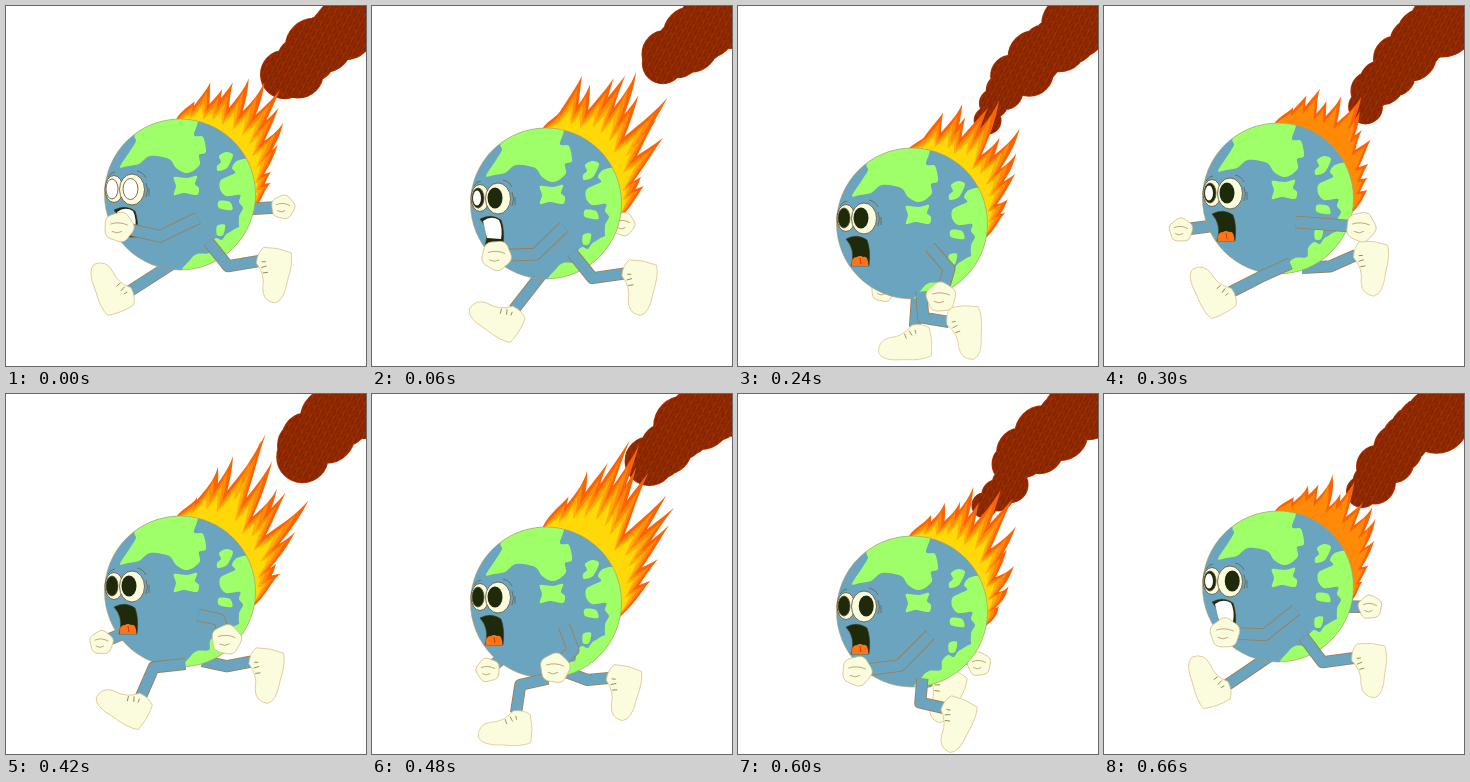
These frames come from a looping animation (360 px wide and 360 px high, 0.72 s). An HTML page:

```html
<!DOCTYPE html>
<html lang="en">
<head>
<meta charset="utf-8">
<title>Running Earth</title>
<style>
html, body { margin: 0; width: 100%; height: 100%; overflow: hidden; background: #fff; }
svg { display: block; width: 100vw; height: 100vh; }
</style>
</head>
<body>
<svg viewBox="0 0 360 360">
  <defs>
    <clipPath id="disc"><circle cx="174" cy="188.5" r="75.5"/></clipPath>
    <pattern id="soot" width="7" height="9" patternUnits="userSpaceOnUse" patternTransform="rotate(28)">
      <rect width="7" height="9" fill="#912a00"/>
      <path d="M1 0V6M4.5 3V9" stroke="#7c2300" stroke-width="1.3"/>
      <path d="M6.3 0V5" stroke="#aa3200"/>
    </pattern>
  </defs>
  <g id="smoke"></g>
  <g id="fire"></g>
  <g id="back"></g>
  <g id="globe">
    <circle cx="174" cy="188.5" r="75.5" fill="#6aa4be"/>
    <g id="land" clip-path="url(#disc)"></g>
    <circle cx="174" cy="188.5" r="75.5" fill="none" stroke="#b59a62" stroke-width=".6"/>
    <g id="face"></g>
  </g>
  <g id="front"></g>
</svg>
<script>
const STEP = 60, STEPS = 12, STRIDE = 6, CX = 174, CY = 188.5, R = 75.5;
const BLUE = '#6aa4be', GREEN = '#9fff68', CREAM = '#fbfbde', INK = '#a07c4c', DARK = '#1e2a09';
const { sin, cos, PI, hypot, max, min } = Math;

const $ = id => document.getElementById(id);
const clamp = v => max(0, min(1, v));
const mix = (a, b, t) => a + (b - a) * t;
const wave = turns => cos(2 * PI * turns);

function random(seed) {
  let s = seed * 7919 + 17;
  return () => (s = (s * 16807) % 2147483647) / 2147483647;
}

const path = (d, fill, stroke = 'none', w = 1) =>
  `<path d="${d}" fill="${fill}" stroke="${stroke}" stroke-width="${w}" stroke-linejoin="round"/>`;
const oval = (x, y, rx, ry, fill, stroke = 'none') =>
  `<ellipse cx="${x}" cy="${y}" rx="${rx}" ry="${ry}" fill="${fill}" stroke="${stroke}" stroke-width=".8"/>`;

// Closed smooth curve through the given points
function coast(s) {
  const n = s.split(' ').map(Number), p = [];
  for (let i = 0; i < n.length; i += 2) p.push([n[i], n[i + 1]]);
  const at = i => p[(i + p.length) % p.length];
  const handle = (i, side) => at(i).map((v, k) => v + side * (at(i + 1)[k] - at(i - 1)[k]) / 7);
  return 'M' + p[0] + p.map((_, i) => `C${handle(i, 1)} ${handle(i + 1, -1)} ${at(i + 1)}`).join('') + 'Z';
}

$('land').innerHTML = [
  '114 161 124 145 130 135 129 128 145 108 190 110 188 129 197 131 200 146 193 149 194 158 187 165 179 167 170 162 163 153 144 150 133 158 122 160',
  '168 171 181 172 191 170 189 178 193 182 191 189 178 187 168 189 170 180',
  '213 150 220 146 227 149 221 162 212 165 211 160 215 156',
  '246 153 231 155 226 162 229 167 215 174 214 183 220 190 234 189 233 196 237 202 233 211 236 224 262 215 262 165',
  '213 195 224 196 226 204 213 202',
  '211 220 219 219 217 229 211 229',
  '178 268 184 254 191 248 203 247 204 238 210 232 216 234 222 227 240 222 240 270'
].map(s => path(coast(s), GREEN)).join('');

// Height of the bounce over one stride
const drops = [0, 9, 20, 29, 29, 4];

// Key poses as [step, x, y, tilt]
const keys = {
  nearFoot: [[0, 253, 255, -75], [2, 252, 280, -75], [4, 211, 316, -88], [5, 127, 286, 66], [6, 126, 286, 66],
    [8, 144, 319, 3], [10, 206, 314, -62], [11, 250, 264, -82]],
  farFoot: [[0, 124, 285, 72], [2, 160, 322, 0], [4, 177, 321, 0], [5, 252, 249, -78], [6, 254, 251, -78],
    [8, 237, 284, -72], [10, 196, 284, -60], [11, 123, 291, 74]],
  nearHand: [[0, 113, 221], [2, 136, 278], [4, 203, 291], [5, 257, 221], [6, 258, 217],
    [8, 183, 274], [10, 119, 277], [11, 121, 239]],
  farHand: [[0, 277, 201], [2, 225, 235], [4, 145, 284], [5, 77, 224], [6, 75, 221],
    [8, 116, 276], [10, 241, 270], [11, 266, 213]]
};

function pose(name, step) {
  const track = keys[name];
  const j = track.findIndex(k => k[0] >= step), b = track[j], a = track[max(0, j - 1)];
  const t = a === b ? 0 : (step - a[0]) / (b[0] - a[0]);
  return a.map((v, k) => mix(v, b[k], t)).slice(1);
}

// Two-part limb whose joint sits beside the straight line
function limb(ax, ay, bx, by, bend, w) {
  const d = hypot(bx - ax, by - ay) || 1;
  const jx = (ax + bx) / 2 - (by - ay) / d * bend, jy = (ay + by) / 2 + (bx - ax) / d * bend;
  const line = `M${ax},${ay}L${jx},${jy}L${bx},${by}`;
  return path(line, 'none', INK, w + 1.6) + path(line, 'none', BLUE, w);
}

const SHOE = 'M-3,-2Q8,-4 15,1Q19,15 17,30Q8,35 -12,34Q-34,36 -38,27Q-39,14 -26,11Q-12,10 -3,-2Z';
const shoe = (x, y, tilt) => `<g transform="translate(${x} ${y}) rotate(${tilt}) scale(.96)">` +
  path(SHOE, CREAM, '#dcc594', .8) + path('M-11,7l2,5M-6,4l3,5M0,3l1,4', 'none', '#8e8a4c', .9) + '</g>';

function hand(x, y, r) {
  let d = '';
  for (let a = 0; a < 2 * PI; a += PI / 18) {
    const k = r * (1 + .05 * cos(5 * a + x));
    d += (d ? 'L' : 'M') + (x + k * cos(a)) + ',' + (y + k * sin(a));
  }
  const folds = `M${x - r * .6},${y - r * .2}q${r * .6},-3 ${r * 1.2},1M${x - r * .5},${y + r * .3}q${r * .4},3 ${r * .7},0`;
  return path(d + 'Z', CREAM, '#d5b982', .8) + path(folds, 'none', '#b2935e', .8);
}

function farLimbs(step, y) {
  const [hx, hy] = pose('farHand', step), [fx, fy, tilt] = pose('farFoot', step);
  return limb(CX, y + 207, hx, hy, 0, 11) + hand(hx, hy, 11.5) +
    limb(mix(180, fx, .25), y + 258, fx, fy, 5 * clamp((fx - 180) / 40), 10.5) + shoe(fx, fy, tilt);
}

function nearLimbs(step, y) {
  const [hx, hy] = pose('nearHand', step), [fx, fy, tilt] = pose('nearFoot', step);
  const low = fy - y - 254, hipX = 203 - .6 * low, hipY = y + 235 + .66 * low;
  const bend = 16 * clamp((66 - hypot(fx - hipX, fy - hipY)) / 6);
  return limb(hipX, hipY, fx, fy, bend, 10.5) + shoe(fx, fy, tilt) +
    limb(192, y + 212, hx, hy, -14 * clamp((250 - hx) / 40), 11) + hand(hx, hy, 14.5);
}

function face(step) {
  const near = (step + 1) % STEPS;
  const look = 123 + 6 * max(0, wave((step - 10.5) / STEPS)) ** 4;
  const glint = near < 4 || step % STRIDE === 5;
  const blank = step === 0;
  const teeth = near < 3;
  return oval(108, 183, 9, 13.5, CREAM, '#5d4a2c') + oval(126, 183.5, 12.5, 15.5, CREAM, '#5d4a2c') +
    oval(106, 183, 6, 10, blank ? '#fff' : DARK, '#5d4a2c') +
    (glint ? oval(105, 183, 4, 7.5, '#fff') : '') +
    oval(look, 183, 7.5, 10.5, blank ? '#fff' : DARK, blank ? '#5d4a2c' : 'none') +
    path('M102,171Q105,166 109,166M131,165Q137,166 140,172M140,177Q143,184 140,191M143,182v8', 'none', '#6e5a38', .7) +
    path('M108,204Q119,198 129,205Q133,215 131,231L113,231Q118,215 108,204Z', DARK, '#4a3a1c', .6) +
    (teeth
      ? path('M111,206Q119,200 127,205Q131,213 129,224L115,223Z', '#fff')
      : path('M113.5,231Q113,222 119,222Q122,220 125,222Q130,220 130.5,231Z', '#ff7417') +
        path('M122,223l1,6', 'none', '#c43c00'));
}

// One tongue of flame from a rim point, leaning along angle a
function tongue(x, y, a, len, w, curl) {
  const dx = cos(a), dy = sin(a);
  const p = (along, side) => `${x + dx * along - dy * side},${y + dy * along + dx * side}`;
  return `M${p(0, -w)}C${p(len * .4, -w * 1.1)} ${p(len * .65, curl - w * .3)} ${p(len, 0)}` +
    `C${p(len * .7, curl + w * .3)} ${p(len * .5, w * .8)} ${p(0, w)}Z`;
}

function fire(step, y) {
  const reach = 92 + 32 * wave((step - 2) / STRIDE), rnd = random(step + 5), count = 12;
  const tongues = Array.from({ length: count }, (_, i) => {
    const u = i / (count - 1), rim = mix(-86, 6, u) * PI / 180;
    return {
      x: CX + (R - 9) * cos(rim), y: CY + y + (R - 9) * sin(rim),
      a: (-68 + 34 * u * u + 8 * (rnd() - .5)) * PI / 180,
      len: 10 + reach * (.3 + .7 * sin(PI * min(1, u * 1.05))) * mix(.62, 1.05, rnd()),
      curl: mix(-3, 7, rnd())
    };
  });
  const layers = [[1, 1, '#fb6406'], [.8, .85, '#ff8a08'], [.62, .8, '#ffb000'], [.47, .8, '#ffd808']];
  return layers.slice(0, reach > 65 ? 4 : 2).map(([l, w, color]) =>
    path(tongues.map(t => tongue(t.x, t.y, t.a, t.len * l, 11 * w, t.curl * l)).join(''), color)).join('');
}

// Puffs strung along a bowed line from the corner
function smoke(step) {
  const rnd = random(step + 40), reach = .8 - .2 * wave((step - 1) / STRIDE);
  let d = '';
  for (let i = 0; i <= 11; i++) {
    const s = i / 11 * reach, side = 9 * (rnd() - .5);
    const r = (32 - 17 * s * s) * mix(.78, 1.05, rnd());
    const x = 358 - 110 * s + side, y = 10 + 103 * s - 14 * sin(PI * s) + side;
    d += `M${x - r},${y}a${r},${r} 0 1 1 ${2 * r},0a${r},${r} 0 1 1 ${-2 * r},0Z`;
  }
  return path(d, '#b93300', '#b93300', 1.4) + path(d, 'url(#soot)');
}

function draw(step) {
  const y = drops[step % STRIDE];
  $('smoke').innerHTML = smoke(step);
  $('fire').innerHTML = fire(step, y);
  $('back').innerHTML = farLimbs(step, y);
  $('globe').setAttribute('transform', `translate(0 ${y})`);
  $('face').innerHTML = face(step);
  $('front').innerHTML = nearLimbs(step, y);
}

let shown = -1;
const start = performance.now();
function tick() {
  const step = Math.floor((performance.now() - start) / STEP) % STEPS;
  if (step !== shown) draw(shown = step);
  requestAnimationFrame(tick);
}
tick();
</script>
</body>
</html>
```
